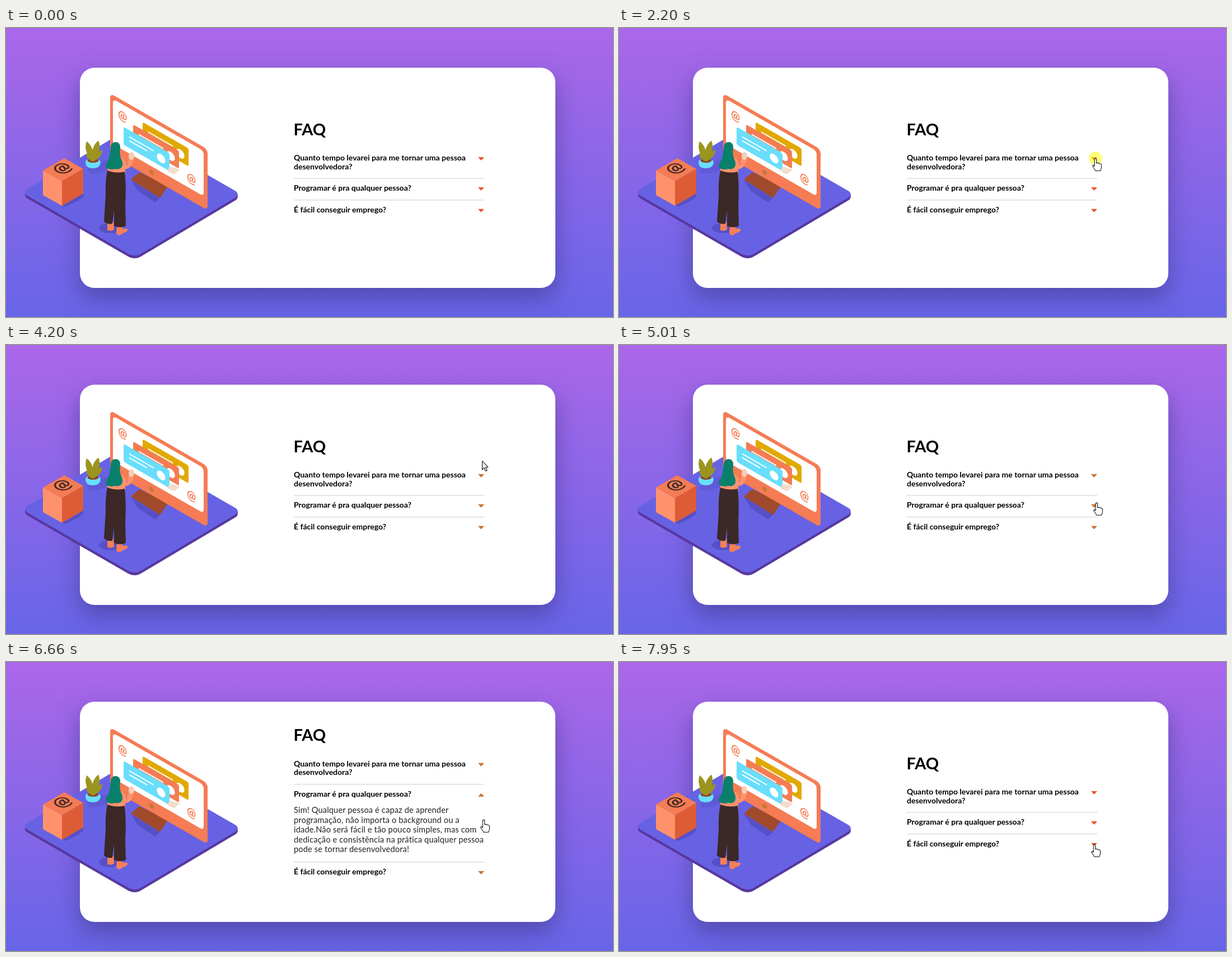
These frames come from a looping animation (1084x517 px, 8 s). An HTML page:

```html
<!DOCTYPE html>
<html lang="pt-BR">
<head>
<meta charset="utf-8">
<title>FAQ</title>
<style>
  html, body { margin: 0; width: 100%; height: 100%; overflow: hidden; }
  body { position: relative; background: linear-gradient(#ab67e9, #6865e7); }
  .card { position: absolute; left: 132px; top: 71px; width: 849px; height: 393.5px; border-radius: 26px;
    background: #fff; box-shadow: 0 18px 42px rgba(53, 50, 122, .52); }
  svg { position: absolute; left: 0; top: 0; display: block; }
  text { font-family: Lato, "Open Sans", sans-serif; }
  .title { font-size: 29px; font-weight: 700; }
  .question { font-size: 14px; font-weight: 700; }
  .answer { font-size: 14.6px; letter-spacing: .15px; fill: #222; }
  .rule { stroke: #ccc; }
  .at { font-weight: 700; text-anchor: middle; }
  .cursor path { fill: #fff; stroke: #111; stroke-width: 1.1; stroke-linejoin: round; }
</style>
</head>
<body>
<div class="card"></div>
<svg width="1084" height="517" viewBox="0 0 1084 517">
  <g id="floor"></g>
  <g fill="#5650c6">
    <path d="M100 318L138 296V302L129 309L106 320Z"/>
    <path d="M223 272L275 304L266 312L236 292Z"/>
    <ellipse cx="170" cy="248" rx="26" ry="9" transform="rotate(-20 170 248)" opacity=".45"/>
    <ellipse cx="186" cy="358" rx="20" ry="9"/>
  </g>

  <path fill="#a04a2b" d="M223 271L238 258L290 282L275 304Z"/>
  <g id="monitor" transform="matrix(1 .575 0 1 186 117)"></g>
  <path fill="#f4dccb" d="M292 248L311 253L300 262L288 256Z"/>

  <g id="box"></g>

  <!-- plant -->
  <path fill="#69defb" d="M142 240Q142 234 155 234T169 240Q168 251 155 251T142 240Z"/>
  <ellipse cx="155.500" cy="237" rx="10" ry="4" fill="#8d4426"/>
  <g id="leaves" fill="#9b941f" transform="translate(155 239)"></g>

  <!-- woman -->
  <g fill="#f58058">
    <path d="M181 347H192L193 361Q188 364 181 362Z"/>
    <path d="M198 355H208V359H217Q219 364 209 367L203 371Q197 370 197 366Z"/>
  </g>
  <path fill="#ff926d" d="M181 249L205 232Q211 231 216 246L220 229L228 234Q226 249 216 252H213V261H181Z"/>
  <ellipse cx="224" cy="229" rx="5" ry="7" fill="#f4cfb9"/>
  <path fill="#3b2827" d="M181 255Q197 261 212 257Q215 285 213 318L214 354Q204 359 193 354V326L190 350Q181 352 175 346L178 300Q177 273 181 255Z"/>
  <path fill="#09806b" d="M187 214C187 201 204 201 204 213C203 224 203 229 207 237C211 249 204 254 195 252C186 255 174 251 179 243C186 234 185 226 187 214Z"/>

  <g id="faq"></g>
  <circle id="halo" r="12" fill="#ff0" opacity=".5"/>
  <g id="cursor" class="cursor">
    <path id="arrow" d="M.5 .5V16L4 12.700L6.500 18.500L9 17.400L6.500 11.700H10.800Z"/>
    <path id="hand" d="M-1.800 1.600Q0 -.9 1.700 1.600V9Q3.200 7.300 4.600 9.200Q6.300 8 7.500 10Q9.500 9 10.500 11.500V16.500Q10.200 19 8.600 22.500H0Q-2 18.500 -4.900 15Q-5.700 12.800 -3.700 12.600L-1.800 14.300Z"/>
  </g>
</svg>
<script>
const LOOP = 8000, TICK = 70;
const ORANGE = '#f57c54';
const $ = id => document.getElementById(id);

function add(parent, tag, attrs, text = '') {
  const el = document.createElementNS('http://www.w3.org/2000/svg', tag);
  for (const key in attrs) el.setAttribute(key, attrs[key]);
  el.textContent = text;
  parent.append(el);
  return el;
}

const rect = (parent, x, y, width, height, rx, fill) =>
  add(parent, 'rect', { x, y, width, height, rx, fill });
const at = (parent, size, fill, transform) =>
  add(parent, 'text', { class: 'at', 'font-size': size, fill, transform }, '@');

function drawFloor() {
  for (let depth = 5; depth >= 0; depth--) {
    const slab = rect($('floor'), 0, 0, 233, 221, 12, depth ? '#59379f' : '#6762e3');
    slab.setAttribute('transform', `matrix(.866 .5 .859 -.512 28 ${294 + depth})`);
  }
}

function drawMonitor() {
  const screen = $('monitor');
  rect(screen, 0, 0, 174, 109, 7, ORANGE);
  rect(screen, 5, 7, 162, 81, 6, '#fff');
  add(screen, 'circle', { cx: 74, cy: 98.5, r: 4, fill: '#c07a3a' });
  at(screen, 22, ORANGE, 'translate(22 35) scale(.87 1)');
  at(screen, 22, ORANGE, 'translate(145 76.500) scale(.87 1)');
  ['#e1a900', ORANGE, '#69defb'].forEach((fill, i) => {
    const g = add(screen, 'g', { transform: `translate(${58 - 17 * i} ${18 + 14 * i})` });
    rect(g, 0, 0, 82, 32, 3, fill);
    add(g, 'path', { d: 'M10 12H54M10 19H42', stroke: '#fff', 'stroke-width': 2.2 });
    add(g, 'circle', { cx: 67, cy: 18, r: 7.7, fill: '#fff' });
  });
}

function drawBox() {
  const right = '38 -22', left = '34 19', down = '0 44';
  const face = (u, v, corner, fill) => rect($('box'), 0, 0, 1, 1, 0, fill)
    .setAttribute('transform', `matrix(${u} ${v} ${corner})`);
  face(left, right, '66 255', ORANGE);
  face(left, down, '66 255', '#ff926d');
  face(right, down, '100 274', '#de5c35');
  at($('box'), 32, '#3b2827', 'matrix(.866 -.5 .866 .5 109 256)');
}

function drawLeaves() {
  for (const [angle, length] of [[-17, 38], [15, 39], [40, 27], [-40, 19]]) {
    const w = length * .3, mid = -length * .6;
    add($('leaves'), 'path', {
      d: `M0 0Q${-w} ${mid} 0 ${-length}Q${w} ${mid} 0 0Z`, transform: `rotate(${angle})`
    });
  }
}

drawFloor();
drawMonitor();
drawBox();
drawLeaves();

const questions = [
  ['Quanto tempo levarei para me tornar uma pessoa', 'desenvolvedora?'],
  ['Programar é pra qualquer pessoa?'],
  ['É fácil conseguir emprego?']
];
const answers = [
  ['Não há um tempo certo. Seu desenvolvimento vai',
    'depender da dedicação, comprometimento, tempo',
    'de estudo e sua evolução pessoal'],
  ['Sim! Qualquer pessoa é capaz de aprender',
    'programação, não importa o background ou a',
    'idade.Não será fácil e tão pouco simples, mas com',
    'dedicação e consistência na prática qualquer pessoa',
    'pode se tornar desenvolvedora!']
];
const LINE = 17.5, TOP = 224, BOTTOM = 345;

const addLines = (parent, cls, y, step, lines) => lines.forEach((line, i) =>
  add(parent, 'text', { class: cls, x: 514, y: y + i * step }, line));

const title = add($('faq'), 'text', { class: 'title', x: 513.5, y: 191.5 }, 'FAQ');
let base = 237;
const items = questions.map((lines, i) => {
  const g = add($('faq'), 'g', {});
  if (i) add(g, 'path', { class: 'rule', d: `M514 ${base - 22}H854` });
  addLines(g, 'question', base, 15.5, lines);
  const tri = add(g, 'path', { d: 'M-5.500 -3H5.500L0 3Z' });
  const mark = base - 3;
  base += 23.3 + 15.4 * lines.length;
  const answer = add(g, 'g', {});
  addLines(answer, 'answer', base - 9.5, LINE, answers[i] || []);
  const growth = answers[i] ? answers[i].length * LINE + 13 : 0;
  return { g, tri, mark, answer, growth };
});

// Click time, item open afterwards, arrow colour
const clicks = [
  [-TICK, -1, '#e8592f'],
  [2230, 0, '#d96f2b'],
  [4000, -1, '#c77231'],
  [5340, 1, '#c77231'],
  [7240, -1, '#ee5427']
];
// Cursor stops: departure, arrival, x, y, sideways bend
const stops = [
  [180, 460, 845, 398, 0],
  [860, 1270, 851, 233, -10],
  [3660, 3870, 850, 207, 0],
  [4400, 4740, 853, 282, 12],
  [6730, 7080, 850, 248, 0],
  [7520, 7950, 849, 326, 14]
];
const ease = p => p * p * (3 - 2 * p);

function cursorAt(t) {
  const i = stops.findLastIndex(s => t >= s[0]);
  if (i < 0) return null;
  const [start, end, x, y, bend] = stops[i];
  const [, , x0, y0] = stops[i - 1] || [0, 0, 1060, 560];
  const steps = Math.round((end - start) / TICK);
  const gap = (end - start) / steps;
  const p = ease(Math.min(1, (Math.floor((t - start) / gap + 1e-6) + 1) / (steps + 1)));
  return [x0 + (x - x0) * p + bend * Math.sin(Math.PI * p), y0 + (y - y0) * p];
}

const show = (el, on) => el.setAttribute('visibility', on ? 'visible' : 'hidden');
const place = (el, x, y) => el.setAttribute('transform', `translate(${x} ${y})`);

function draw(t) {
  const [, open, color] = clicks.findLast(c => t >= c[0] + TICK);
  const half = open < 0 ? 0 : items[open].growth / 2;
  place(title, 0, -half);
  items.forEach(({ g, tri, mark, answer }, i) => {
    place(g, 0, i > open ? half : -half);
    tri.setAttribute('transform', `translate(848.5 ${mark}) scale(1 ${i === open ? -1 : 1})`);
    tri.setAttribute('fill', color);
    show(answer, i === open);
  });

  const pos = cursorAt(t);
  const hovering = pos && pos[1] > TOP - half && pos[1] < BOTTOM + half;
  show($('arrow'), pos && !hovering);
  show($('hand'), hovering);
  show($('halo'), pos && clicks.some(([c]) => t >= c - TICK / 2 && t < c + 2 * TICK));
  if (pos) {
    place($('cursor'), ...pos);
    place($('halo'), ...pos);
  }
}

const begin = performance.now();
function tick() {
  draw((performance.now() - begin) % LOOP);
  requestAnimationFrame(tick);
}
draw(0);
requestAnimationFrame(tick);
</script>
</body>
</html>
```
